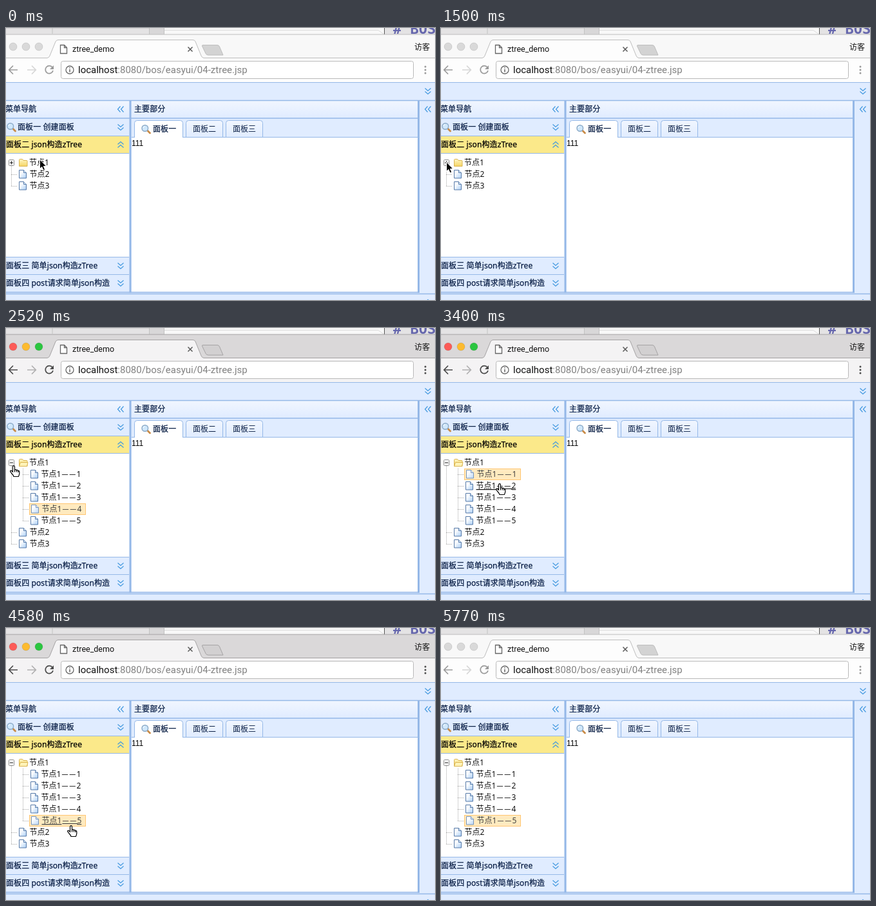
An HTML page for the animation above (5.83 s loop, 666 px wide and 422 px high).

```html
<!DOCTYPE html>
<html lang="zh">
<head>
<meta charset="utf-8">
<title>ztree_demo</title>
<style>
  html, body { margin: 0; width: 100%; height: 100%; overflow: hidden; background: #fff; }
  svg { display: block; width: 100%; height: 100%;
    --title: #f8f8f8; --bar: #fdfdfd; --ink: #9a9a9a; --plus: #d3d3d3;
    --red: #d9d9d9; --amber: #d9d9d9; --green: #d9d9d9; --edge: #bdbdbd; }
  svg.active { --title: #dad8d9; --bar: #f4f3f4; --ink: #4a4a4a; --plus: #d2d0d1;
    --red: #fc5b57; --amber: #fdbb2f; --green: #2bc640; --edge: #a5a3a4; }
  text { font: 12px "Noto Sans", "Noto Sans CJK SC", "Noto Sans CJK", sans-serif; fill: #111; white-space: pre; }
  .head { fill: #0a1f45; stroke: #0a1f45; stroke-width: .25px; letter-spacing: .1px; }
  .open { fill: #000; stroke: #000; }
  .tab { fill: #0a1f45; }
  .ui { font-family: Roboto, sans-serif; }
  .line { fill: none; stroke: #95b8e7; }
  .dots { fill: none; stroke: #aaa; stroke-dasharray: 1 1; }
  .nav { fill: none; stroke: var(--ink); stroke-width: 1.7px; }
  .chevron { fill: none; stroke: #4399e0; stroke-width: 1.2px; }
  .dash { font-size: 10px; letter-spacing: 2px; }
  .hover text { text-decoration: underline; }
  .mark { fill: #ffe6b0; stroke: #ffb951; visibility: hidden; }
  .selected { opacity: .8; }
  .selected .mark { visibility: visible; }
  .selected .label { transform: translate(1px, 0); }
</style>
</head>
<body>
<svg id="stage" viewBox="0 0 666 422" preserveAspectRatio="none">
  <defs>
    <linearGradient id="shine" x2="0" y2="1"><stop stop-color="#f1f6ff"/><stop offset="1" stop-color="#e0ecff"/></linearGradient>
    <linearGradient id="page" x2="1" y2="1"><stop offset=".3" stop-color="#fff"/><stop offset="1" stop-color="#a9cdf5"/></linearGradient>
    <linearGradient id="gold" x2="0" y2="1"><stop stop-color="#fff6c4"/><stop offset="1" stop-color="#f5d565"/></linearGradient>
    <g id="doc">
      <path d="M.5 .5h7l4 4v8.500h-11z" fill="url(#page)" stroke="#5579a8"/>
      <path d="M7.500 .5v4h4" fill="#dcebfb" stroke="#5579a8"/>
    </g>
    <g id="lens">
      <path d="M9.500 9L13.500 13" stroke="#c98c49" stroke-width="2.800" stroke-linecap="round"/>
      <circle cx="5.800" cy="5.500" r="4.800" fill="#cfe7fb" stroke="#8aa9c6" stroke-width="1.400"/>
      <path d="M3 5a3 3 0 0 1 2.500-2.400" fill="none" stroke="#fff"/>
    </g>
    <path id="arrow" d="M.5 0v14.400l3.200-3 2.300 5.400 2.600-1.100-2.300-5.200h4.400z" fill="#000" stroke="#fff"/>
    <path id="hand" d="M4.500 2.500Q4.500 .7 6 .7T7.500 2.500V7Q9.500 6 10.300 7.600 12 6.800 12.800 8.400 14.800 8 14.800 10.500V12.500Q14.800 14.500 13.300 17.500H6Q5.500 15.500 3.200 13L1 10.200Q0 8 2 8L4.500 10.200zM7.500 7v3.500M10.300 7.600v3M12.800 8.400v2.500" fill="#fff" stroke="#000" stroke-width="1.200"/>
  </defs>

  <!-- windows behind -->
  <rect width="666" height="12" fill="#e4e3e4"/>
  <path d="M0 .5H222" stroke="#d4d4d4"/>
  <rect x="222" width="24" height="12" fill="#d8d7d8"/>
  <rect x="246" width="341" height="12" fill="#f8f8f8"/>
  <path d="M222.500 0V10M245.500 0V10M72 0v9" stroke="#c2c2c2"/>
  <path d="M246 3.500H578L587 10" fill="none" stroke="#dcdcdc"/>
  <path d="M587.500 0V10" stroke="#555"/>
  <text x="601" y="9" style="font:bold 22px 'DejaVu Sans Mono',monospace;fill:#6667ad"># BOS</text>

  <!-- browser -->
  <rect y="10" width="666" height="37" fill="var(--title)"/>
  <path d="M0 10H666" stroke="var(--edge)"/>
  <rect y="46" width="666" height="38" fill="var(--bar)"/>
  <path d="M0 46.500H64Q67 46 68 43L77 21Q78.500 18.500 81 18.500H290Q293 18.500 294 21L303 43Q304 46 307 46.500H666" fill="var(--bar)" stroke="var(--edge)"/>
  <path d="M306 26.500H328Q330.500 26.500 331.500 29L337 42H314Q311 42 310 39.500L304.500 28Q304 26.500 306 26.500z" fill="var(--plus)" stroke="var(--edge)"/>
  <g stroke="#0002" stroke-width=".8">
    <circle cx="11" cy="29" r="6" fill="var(--red)"/>
    <circle cx="31" cy="29" r="6" fill="var(--amber)"/>
    <circle cx="51" cy="29" r="6" fill="var(--green)"/>
  </g>
  <path d="M84.500 26.500h6l4 4v9h-10zM90.500 26.500v4h4" fill="#fff" stroke="#666" stroke-width="1.300"/>
  <text class="ui" x="103" y="37" style="font-size:12.500px">ztree_demo</text>
  <path d="M282.500 29.500l7 7m0-7l-7 7" stroke="#5a5a5a" stroke-width="1.500"/>
  <text x="634" y="34">访客</text>
  <path class="nav" d="M18 65H5M11 58.500L4.700 65 11 71.500"/>
  <path class="nav" d="M33 65H46M40 58.500L46.300 65 40 71.500" opacity=".4"/>
  <path class="nav" d="M72 61a6 6 0 1 0 1 5"/>
  <path d="M74 58v6h-6z" fill="var(--ink)"/>
  <rect x="85.500" y="51.500" width="547" height="27" rx="3" fill="#fff" stroke="#b9b9b9"/>
  <circle cx="99" cy="65" r="6" fill="none" stroke="#666" stroke-width="1.300"/>
  <path d="M99 64v4.500M99 61v1.600" stroke="#666" stroke-width="1.500"/>
  <text class="ui" x="112" y="70" style="font-size:15px">localhost<tspan fill="#818181">:8080/bos/easyui/04-ztree.jsp</tspan></text>
  <g fill="var(--ink)"><circle cx="651" cy="60" r="1.500"/><circle cx="651" cy="65" r="1.500"/><circle cx="651" cy="70" r="1.500"/></g>

  <!-- page layout -->
  <rect y="84" width="666" height="338" fill="#e0ecff"/>
  <rect y="113" width="191" height="26" fill="url(#shine)"/>
  <rect x="195" y="113" width="444" height="26" fill="url(#shine)"/>
  <rect y="168" width="191" height="26" fill="#fbe98a"/>
  <rect y="195" width="192" height="160" fill="#fff"/>
  <rect x="195" y="170" width="444" height="240" fill="#fff"/>
  <path class="line" d="M0 84.500H666M0 167.500H191M0 194.500H191M0 355.500H191M0 382.500H191M195 169.500H640"/>
  <path class="line" d="M0 112.500H666M0 140H640M0 410H640M0 412.500H666" stroke-width="1.600"/>
  <path class="line" d="M193 112V411M640.500 112V411" stroke-width="3"/>

  <text class="head" x="-1" y="130">菜单导航</text>
  <text class="head" x="199" y="130">主要部分</text>
  <use href="#lens" x="1" y="147"/>
  <text class="head" x="18" y="158">面板一 创建面板</text>
  <text class="head open" x="0" y="185">面板二 json构造zTree</text>
  <text class="head" x="0" y="373">面板三 简单json构造zTree</text>
  <text class="head" x="0" y="400">面板四 post请求简单json构造</text>

  <path class="line" d="M199.500 170V147.500q0-4 4-4h67q4 0 4 4V170" style="fill:#fff"/>
  <path class="line" d="M279.500 169.500V147.500q0-4 4-4h49q4 0 4 4v22z" style="fill:url(#shine)"/>
  <path class="line" d="M341.500 169.500V147.500q0-4 4-4h49q4 0 4 4v22z" style="fill:url(#shine)"/>
  <use href="#lens" x="210" y="150"/>
  <text class="head" x="228" y="161">面板一</text>
  <text class="tab" x="290" y="161">面板二</text>
  <text class="tab" x="352" y="161">面板三</text>
  <text x="195" y="183" style="font-family:'Liberation Sans',sans-serif;fill:#000">111</text>

  <g id="chevrons"></g>
  <path id="trunk" class="dots"/>
  <rect x="4.500" y="204.500" width="8" height="9" rx="1" fill="#fff" stroke="#8d8d8d"/>
  <path d="M6 209H11" stroke="#111"/>
  <path id="plus" d="M8.500 206.500V211.500" stroke="#111"/>
  <path d="M20.500 214.500v-10q0-1 1-1h4l1.500 2h5q1 0 1 1v8z" fill="url(#gold)" stroke="#dab450"/>
  <path id="flap" d="M20.500 214.500l2-6h11.500l-1.500 6z" fill="#fff3b8" stroke="#dab450"/>
  <text x="36" y="213">节点1</text>
  <g id="children"></g>
  <g id="siblings"></g>
  <use id="cursor"/>
</svg>

<script>
const $ = id => document.getElementById(id);
const ROW = 18, LOOP = 5830;
const numbers = [1, 2, 3, 4, 5];

const chevron = (x, y, angle) =>
  `<path class="chevron" transform="translate(${x} ${y}) rotate(${angle})" d="M-.5 -4.5l-4 4.5 4 4.5M4.5 -4.5l-4 4.5 4 4.5"/>`;
const LEFT = 0, UP = 90, DOWN = -90;
$('chevrons').innerHTML = [
  [655, 98, DOWN], [178, 126, LEFT], [655, 126, LEFT], [178, 154, DOWN],
  [178, 181, UP], [178, 369, DOWN], [178, 396, DOWN], [655, 426, UP]
].map(c => chevron(...c)).join('');

const leaf = (x, y, label) =>
  `<g class="label"><use href="#doc" x="${x}" y="${y - 7}"/><text x="${x + 16.5}" y="${y + 4}">${label}</text></g>`;

$('children').innerHTML = numbers.map(n => {
  const y = 209 + n * ROW;
  return `<g class="child"><rect class="mark" x="36.5" y="${y - 8.5}" width="87" height="17"/>` +
    leaf(38, y, `节点1<tspan class="dash" dx="1" dy="-1">——</tspan><tspan dx="-1" dy="1">${n}</tspan>`) + '</g>';
}).join('') + `<path class="dots" d="M26.5 218V299${numbers.map(n => `M26 ${209.5 + n * ROW}H36`).join('')}"/>`;
$('siblings').innerHTML = leaf(20, 227, '节点2') + leaf(20, 245, '节点3');
const children = document.querySelectorAll('.child');

// Each step: time, then only the properties that change.
const steps = [
  [0, { cursor: 'arrow', x: 52, y: 204, selected: 4, hover: 0, open: false, active: false }],
  [150, { x: 46, y: 209 }],
  [600, { x: 42, y: 211 }],
  [750, { x: 32, y: 211 }],
  [900, { x: 22, y: 210 }],
  [1050, { x: 13, y: 209 }],
  [1200, { x: 8, y: 210 }],
  [1500, { x: 8, y: 208 }],
  [1640, { active: true }],
  [1790, { cursor: 'hand', x: 6, y: 212 }],
  [2090, { x: -1, y: 212 }],
  [2380, { x: 3, y: 212, open: true }],
  [2520, { x: 6, y: 213 }],
  [2670, { x: 34, y: 217 }],
  [2820, { x: 66, y: 223, hover: 1 }],
  [2960, { x: 83, y: 226 }],
  [3250, { selected: 1 }],
  [3400, { x: 85, y: 241, hover: 2 }],
  [3690, { selected: 2 }],
  [3840, { x: 88, y: 262, hover: 3 }],
  [3980, { x: 92, y: 281, hover: 4 }],
  [4280, { x: 94, y: 301, selected: 4, hover: 5 }],
  [4580, { x: 95, y: 306, selected: 5 }],
  [4730, { cursor: 'arrow', x: 150, y: 318, hover: 0 }],
  [4880, { x: 290, y: 342 }],
  [5020, { x: 455, y: 372 }],
  [5170, { x: 610, y: 408 }],
  [5320, { cursor: '' }],
  [5770, { active: false }]
];
let previous = {};
const states = steps.map(([time, change]) => previous = { ...previous, ...change, time });

function show({ cursor, x, y, selected, hover, open, active }) {
  $('stage').classList.toggle('active', active);
  for (const id of ['children', 'flap']) $(id).style.display = open ? '' : 'none';
  $('plus').style.display = open ? 'none' : '';
  const shift = open ? numbers.length * ROW : 0;
  $('siblings').setAttribute('transform', `translate(0 ${shift})`);
  $('trunk').setAttribute('d', `M8.5 214V${245 + shift}M8 ${227.5 + shift}H18M8 ${245.5 + shift}H18`);
  children.forEach((child, i) => {
    child.classList.toggle('selected', i + 1 === selected);
    child.classList.toggle('hover', i + 1 === hover);
  });
  $('cursor').setAttribute('href', '#' + cursor);
  $('cursor').setAttribute('transform', `translate(${x} ${y})`);
  $('cursor').style.display = cursor ? '' : 'none';
}

let shown;
function tick() {
  const time = performance.now() % LOOP;
  const state = states.findLast(s => s.time <= time);
  if (state !== shown) show(shown = state);
  requestAnimationFrame(tick);
}
tick();
</script>
</body>
</html>
```
